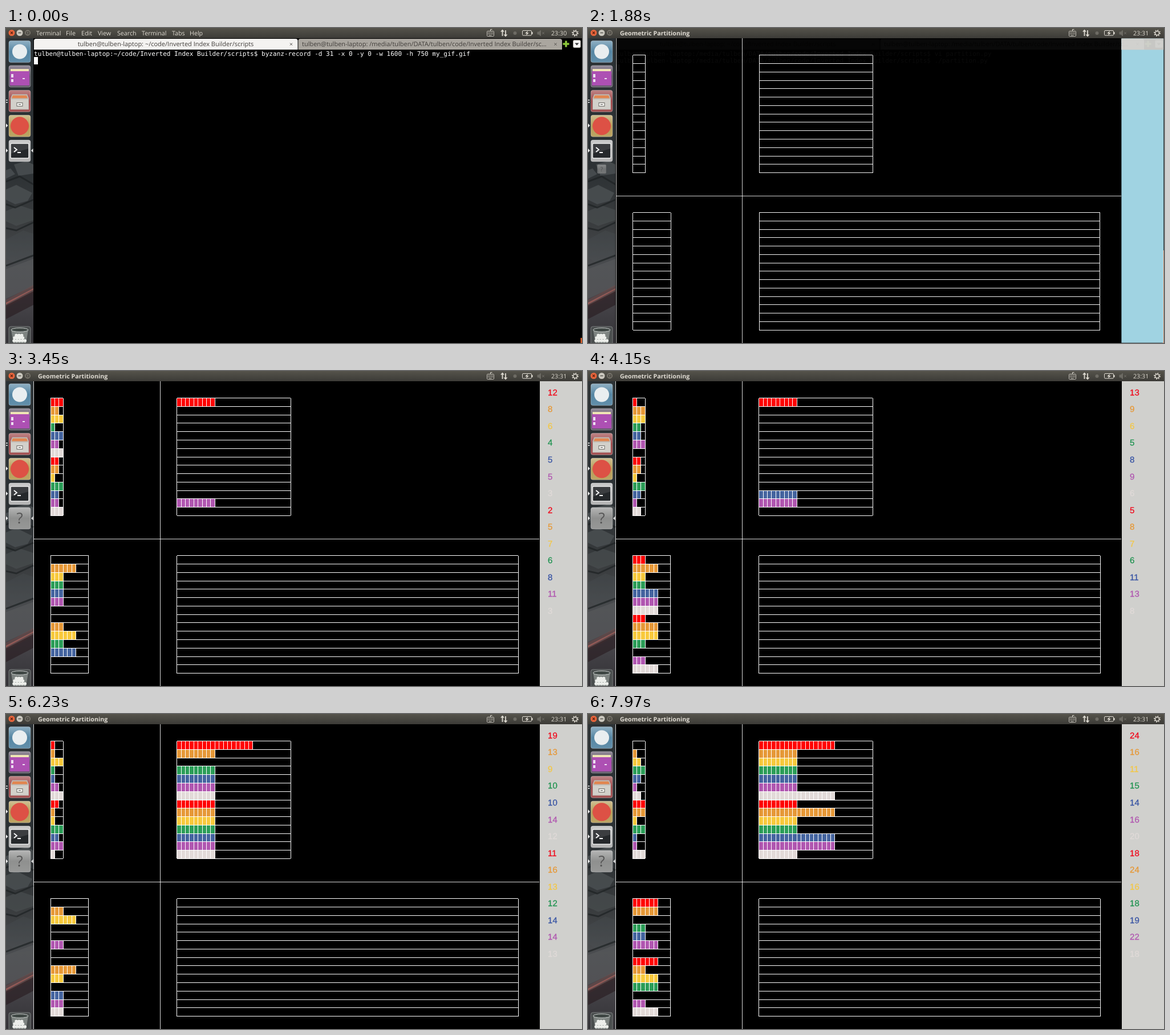
Animation of 1010x554 px, one loop 8 s. Source, as an HTML page:

```html
<!DOCTYPE html>
<html lang="en">
<head>
<meta charset="utf-8">
<title>Geometric Partitioning</title>
<style>
  html, body { margin: 0; width: 100%; height: 100%; overflow: hidden; background: #000; }
  svg { display: block; width: 1010px; height: 554px; }
  text { font-family: "Open Sans", "Noto Sans", sans-serif; font-size: 11px; white-space: pre; text-rendering: geometricPrecision; }
  .bar text { fill: #dfdbd2; font-size: 10.7px; }
  .term text { font-family: "DejaVu Sans Mono", monospace; font-size: 11.05px; fill: #fff; }
  .panel text { font-family: "Liberation Sans", Arial, sans-serif; font-size: 20.3px; stroke-width: .4; }
  .chart, #cursor { shape-rendering: crispEdges; }
  .wire { fill: none; stroke: #fff; stroke-width: 1.353; }
</style>
</head>
<body>
<svg viewBox="0 0 1010 554">
  <defs>
    <linearGradient id="barFill" x2="0" y2="1"><stop stop-color="#55534b"/><stop offset="1" stop-color="#3c3b37"/></linearGradient>
    <linearGradient id="dockFill" x2="0" y2="1">
      <stop stop-color="#2c3235"/><stop offset=".4" stop-color="#2b3033"/><stop offset=".6" stop-color="#383b3d"/>
      <stop offset=".75" stop-color="#4a4c4f"/><stop offset=".86" stop-color="#47454a"/><stop offset="1" stop-color="#333236"/>
    </linearGradient>
    <linearGradient id="shine" x2="0" y2="1"><stop stop-color="#fff" stop-opacity=".4"/><stop offset=".5" stop-color="#fff" stop-opacity=".08"/><stop offset="1" stop-color="#fff" stop-opacity=".15"/></linearGradient>
  </defs>

  <g class="term">
    <rect x="48" y="18" width="962" height="536"/>
    <g id="lines"></g>
    <rect id="cursor" width="7" height="12.4" fill="#fff"/>
    <rect id="scroll" x="1007.500" width="2.500" height="164" fill="#d9632f"/>
  </g>
  <g id="tabs">
    <path d="M982 22.500v11M976.500 28h11" stroke="#8cc63a" stroke-width="3.500"/>
    <rect x="994.500" y="21.500" width="13" height="13" rx="2" fill="#f7f6f4" stroke="#9a968f"/>
    <path d="M997.500 26.500h7l-3.500 4z" fill="#333"/>
  </g>

  <g id="window">
    <rect x="48" y="18" width="888" height="536"/>
    <rect id="panelFill" x="936" y="18" width="74" height="536"/>
    <rect x="936" y="18" width="74" height="20" fill="#d0d0cd"/>
    <g transform="translate(48.500 18) scale(.739)">
      <g class="chart" id="chart"></g>
      <g class="panel" id="panel"></g>
    </g>
  </g>

  <g id="dock">
    <rect y="18" width="48" height="536" fill="url(#dockFill)"/>
    <g fill="#4b5053">
      <path d="M14 240l22-6 12 6v16l-26 4zM0 284l18-8 28 14-8 14-22 6-16-8zM0 250l8-3 8 10-16 8z" opacity=".8"/>
      <path d="M0 322l24-10 24 8v18l-30 10-18-8z" opacity=".6"/>
      <path d="M0 372l30-16 18 6v40L16 414 0 404z" opacity=".3"/>
      <path d="M0 424l48-18v48L0 476z" fill="#5c5e61" opacity=".5"/>
    </g>
    <path d="M0 270l24-9 24 14M0 310l16 6 32-14M0 352l18 4 30-14M0 418l48-18" fill="none" stroke="#1d2123" stroke-width="3" opacity=".7"/>
    <path d="M0 478L48 452v14L0 492z" fill="#8c4a44" opacity=".3"/>
    <path d="M0 483L48 458v2L0 486z" fill="#a2605a" opacity=".8"/>
    <path d="M0 488L48 463v24L0 512z" fill="#2b2024" opacity=".7"/>
  </g>

  <g class="bar">
    <rect width="1010" height="18" fill="url(#barFill)"/>
    <circle cx="10" cy="8.500" r="5.500" fill="#e8653c"/><path d="M8 6.500l4 4m0-4l-4 4" stroke="#5a2010" stroke-width="1.200"/>
    <circle cx="24" cy="8.500" r="5.500" fill="#c9c6bd"/><path d="M21.500 8.500h5" stroke="#44423c" stroke-width="1.200"/>
    <circle cx="38" cy="8.500" r="5" fill="#77746b"/><rect x="35.800" y="6.800" width="4.500" height="3.500" fill="none" stroke="#35332f"/>
    <g id="menu"></g>
    <text id="title" x="56" y="12.500" font-weight="700">Geometric Partitioning</text>
    <g fill="none" stroke="#dfdbd2">
      <rect x="843.500" y="5.500" width="12" height="9" rx="1" opacity=".8"/>
      <path d="M845 8h9M845 10.500h9M847 13h5" stroke-dasharray="1.500 1"/><path d="M849.500 5V2.500h3"/>
      <path d="M870.500 14V5M876 4v9" stroke-width="1.800"/>
      <rect x="905.500" y="4.500" width="16" height="8.500" rx="1.500"/><path d="M922.800 7v4" stroke-width="1.500"/>
      <circle cx="998" cy="9" r="3.500" stroke-width="1.500"/><circle cx="998" cy="9" r="5" stroke-width="2" stroke-dasharray="1.500 2.430"/>
    </g>
    <path d="M867 6.500l3.500-4 3.500 4zM872.500 11.500l3.500 4 3.500-4zM915 5l-5 4.500h3L912 13l5-4.500h-3z" fill="#dfdbd2"/>
    <circle cx="892.500" cy="9" r="3" fill="#6d6b64"/>
    <path d="M932 7h2.500l3-3v10l-3-3H932zM940 7l4 4m0-4l-4 4" fill="#6d6b64" stroke="#6d6b64"/>
    <text id="clock" x="956" y="12.500"></text>
  </g>
</svg>

<script>
const $ = id => document.getElementById(id);
const add = (parent, markup) => {
  parent.insertAdjacentHTML('beforeend', markup);
  return parent.lastElementChild;
};
const show = (el, on) => el.setAttribute('display', on ? 'inline' : 'none');
const setAttrs = (el, attrs) => Object.entries(attrs).forEach(([k, v]) => el.setAttribute(k, v));

const LOOP = 8000, ROWS = 14, CELL_W = 10, CELL_H = 20;
const COLORS = ['#ff0000', '#e69837', '#f8c93c', '#2b9d57', '#44649f', '#b056b0', '#e2dad8'];
const NUMBER_COLORS = ['#f00a1c', '#e69837', '#f3c745', '#1f9350', '#3854a4', '#b056b0', '#e0dad8'];

// Partition boxes: left, top and capacity in cells.
const BOXES = [[40, 40, 3], [40, 415, 9], [340, 40, 27], [340, 415, 81]];

// ---- Partitioning: every op writes one cell ----
const GOALS = [
  { end: 3450, counts: [12, 8, 6, 4, 5, 5, 3, 2, 5, 7, 6, 8, 11, 3], last: 4, tail: 0 },
  { end: 4850, counts: [15, 10, 6, 9, 9, 9, 9, 7, 9, 10, 8, 12, 13, 11], last: 5, tail: 1 },
  { end: 7070, counts: [20, 15, 9, 13, 12, 15, 14, 14, 18, 14, 16, 19, 19, 16], last: 8, tail: 2 },
  { end: 7970, counts: [24, 16, 11, 15, 14, 16, 20, 18, 24, 16, 18, 19, 22, 18], last: 0, tail: 1 },
];
const ops = [];
const cells = Array.from({ length: ROWS }, () => [0, 0, 0]);
const counts = Array(ROWS).fill(0);
let seed = 7;
const random = () => (seed = seed * 16807 % 2147483647) / 2147483647;

function record(row) {
  ops.push({ row, cells: [...cells[row]], label: counts[row] });
}

function grow(row) {
  const c = cells[row];
  if (c[0] === 3) {
    const to = c[1] === 6 ? 2 : 1;
    const moved = to === 2 ? 9 : 3;
    c.fill(0, 0, to);
    for (let i = 0; i < moved; i++) { c[to]++; record(row); }
  }
  c[0]++;
  counts[row]++;
  record(row);
}

let previous = { end: 1925, at: 0 };
const segments = GOALS.map(goal => {
  const queue = goal.counts.flatMap((n, row) => Array(n - counts[row]).fill(row));
  for (let i = queue.length - 1; i > 0; i--) {
    const j = Math.floor(random() * (i + 1));
    [queue[i], queue[j]] = [queue[j], queue[i]];
  }
  queue.forEach(grow);
  grow(goal.last);
  const to = { end: goal.end, at: ops.length - goal.tail };
  const segment = { from: previous, to };
  previous = to;
  return segment;
});

function opsDone(time) {
  const s = segments.find(s => time < s.to.end);
  if (!s) return previous.at;
  const p = Math.max(0, (time - s.from.end) / (s.to.end - s.from.end));
  return Math.floor(s.from.at + p * (s.to.at - s.from.at));
}

// Screen refresh: start, last step, step length.
const REFRESH = [[1780, 16, 830 / 17], [2610, 16, 840 / 17], [3450, 16, 50], [4300, 11, 50],
  [6080, 16, 840 / 17], [6920, 16, 50], [7770, 4, 50]];

function refreshTime(t) {
  const group = REFRESH.filter(g => g[0] <= t).pop();
  if (!group) return t;
  const [start, last, step] = group;
  return start + Math.min(last, Math.floor((t - start) / step + 1e-6)) * step;
}

// ---- Chart ----
const chart = $('chart');
const bars = BOXES.slice(0, 3).map(([x, y]) => Array.from({ length: ROWS }, (_, r) => ({
  fill: add(chart, `<rect x="${x}" y="${y + r * CELL_H}" height="${CELL_H}" fill="${COLORS[r % 7]}"/>`),
  ticks: add(chart, '<path class="wire"/>'),
})));
for (const [x, y, size] of BOXES) {
  const w = size * CELL_W;
  let d = `M${x} ${y}v${ROWS * CELL_H}m${w} 0v${-ROWS * CELL_H}`;
  for (let r = 0; r <= ROWS; r++) d += `M${x} ${y + r * CELL_H}h${w}`;
  add(chart, `<path class="wire" d="${d}"/>`);
}
add(chart, '<path class="wire" stroke-opacity=".85" d="M.3 0V726M300 0V726M0 375H1200"/>');
const numbers = Array.from({ length: ROWS }, (_, r) => {
  const color = NUMBER_COLORS[r % 7];
  return add($('panel'), `<text x="1220" y="${33.5 + r * 40}" fill="${color}" stroke="${color}"></text>`);
});

function drawChart(done) {
  const view = Array.from({ length: ROWS }, () => ({ cells: [0, 0, 0], label: '' }));
  for (let i = 0; i < done; i++) {
    const op = ops[i];
    view[op.row].cells = op.cells;
    if (i < done - 1) view[op.row].label = op.label;
  }
  view.forEach((v, r) => {
    numbers[r].textContent = v.label;
    v.cells.forEach((n, b) => {
      const [x, y] = BOXES[b];
      let d = '';
      for (let i = 1; i <= n; i++) d += `M${x + i * CELL_W} ${y + r * CELL_H}v${CELL_H}`;
      bars[b][r].fill.setAttribute('width', n * CELL_W);
      bars[b][r].ticks.setAttribute('d', d);
    });
  });
}

// ---- Terminal ----
const HOST = 'tulben@tulben-laptop:';
const HOME = '~/code/Inverted Index Builder/scripts';
const MEDIA = '/media/tulben/DATA/tulben/code/Inverted Index Builder/scripts';
const homePrompt = `${HOST}${HOME}$ `, mediaPrompt = `${HOST}${MEDIA}$ `;
const CHAR_W = 6.6527, LINE_H = 12.4;
const lines = [0, 1].map(i => add($('lines'), `<text x="49" y="${48.7 + i * LINE_H}"></text>`));

const tabs = [[49, 280, 'middle', `${HOST} ${HOME}`], [512.5, 519, 'start', `${HOST} ${MEDIA.slice(0, -5)}…`]]
  .map(([x, tx, anchor, label]) => {
    const shape = add($('tabs'), `<path d="M${x} 38V22.500q0-3.500 3.500-3.500h455.500q3.500 0 3.500 3.500v15.500z"/>`);
    add($('tabs'), `<text x="${tx}" y="32" fill="#403d3a" text-anchor="${anchor}">${label}</text>`);
    add($('tabs'), `<path d="M${x + 449} 26.500l4 4m0-4l-4 4" stroke="#4a4744"/>`);
    return shape;
  });

function drawTerminal(t) {
  const second = t >= 580;
  const typed = t < 930 ? '' : t < 1340 ? 'vi partition.py ' : './partition.py ';
  const text = second
    ? [mediaPrompt + 'vi partition.py', mediaPrompt + typed]
    : [homePrompt + 'byzanz-record -d 31 -x 0 -y 0 -w 1600 -h 750 my_gif.gif', ''];
  lines.forEach((line, i) => { line.textContent = text[i]; });
  const row = t < 1590 ? 1 : 2;
  const column = row === 1 ? text[1].length : 0;
  setAttrs($('cursor'), { x: 49 + column * CHAR_W, y: 38.8 + row * LINE_H });
  $('scroll').setAttribute('y', second ? 391 : 545);
  tabs.forEach((tab, i) => tab.setAttribute('fill', second === (i === 1) ? '#f4f3f1' : '#aaa69f'));
}

// ---- Menu and launcher ----
const MENU = { 53: 'Terminal', 105: 'File', 132: 'Edit', 161: 'View', 195: 'Search', 238: 'Terminal', 291: 'Tabs', 322: 'Help' };
for (const [x, label] of Object.entries(MENU)) add($('menu'), `<text x="${x}" y="12.500">${label}</text>`);

const dock = $('dock');
const tile = (y, color, art) => add(dock, `<g transform="translate(24 ${y})">
  <rect x="-19" y="-19" width="38" height="38" rx="3.500" fill="${color}" stroke="#c8ccd0" stroke-opacity=".4"/>
  <rect x="-19" y="-19" width="38" height="38" rx="3.500" fill="url(#shine)"/>${art}</g>`);

tile(41.5, '#477c9c', '<circle r="13" fill="#e9eef0"/>');
tile(85, '#4f4257', `<path d="M-16-13h32v5h-32z" fill="#efe5b5"/><path d="M-17-9h34v25h-34z" fill="#ad50b3"/>
  <path d="M-15-4h4v6h-4zM-15 5h4v5h-4zM5 3h4v2h-4z" fill="#ecdff0"/>`);
tile(128.5, '#963537', `<path d="M-13-12h26l3 7v20h-32V-5z" fill="#bdbbb6"/><path d="M-12-10h24l2 5h-28z" fill="#e18650"/>
  <path d="M-15-3h30v17h-30z" fill="#d2d0ca"/><rect x="-5" y="3" width="10" height="6" fill="#f3f2ee" stroke="#6d6b67"/><path d="M-2 6h4" stroke="#555"/>`);
tile(172.3, '#b1954a', '<circle r="16" fill="#dd5145"/>');
tile(216, '#a9a9a9', `<rect x="-16" y="-13" width="32" height="26" rx="2" fill="#25282b" stroke="#ececec" stroke-width="1.500"/>
  <path d="M-16-13h32v9l-32 9z" fill="#fff" opacity=".1"/><path d="M-10-6l5 4-5 4M-4 3h6" fill="none" stroke="#fff" stroke-width="1.800"/>`);
const appTile = tile(259, '#858685', '<text y="9" text-anchor="middle" fill="#555" style="font-size:26px">?</text>');
add(dock, `<g><rect x="5" y="525" width="38" height="38" rx="3.500" fill="#4a4e4e" stroke="#a0a4a4" stroke-opacity=".6"/>
  <path d="M9 531h30l-4 23H13z" fill="#7d8380"/><ellipse cx="24" cy="531" rx="15" ry="3.500" fill="#3f4744" stroke="#cfd3d1"/>
  <path d="M15 545h19M14 550h22M18 540.500h14" stroke="#eceeea" stroke-width="5.500" stroke-linecap="round" stroke-dasharray=".1 4.700"/></g>`);
add(dock, '<path d="M0 168l3.500 3.500L0 175zM0 212l3.500 3.500L0 219zM0 126h3v1.500H0zM0 130h3v1.500H0z" fill="#e8e8e8"/>');
const termArrow = add(dock, '<path d="M47.500 212l-3.500 3.500 3.500 3.500z" fill="#e8e8e8"/>');
const appArrows = add(dock, '<path d="M47.500 255.500l-3.500 3.500 3.500 3.500zM0 255.500l3.500 3.500L0 262.500z" fill="#e8e8e8"/>');

function drawDesktop(t) {
  const open = t >= 1820;
  const opening = t < 1870 ? [.5, .97] : t < 1920 ? [.96, .9985] : [1, 1];
  show($('window'), open);
  show($('menu'), !open);
  show($('title'), open);
  setAttrs($('window'), {
    opacity: opening[0],
    transform: `translate(529 286) scale(${opening[1]}) translate(-529 -286)`,
  });
  $('panelFill').setAttribute('fill', t < 1920 ? '#a7dcec' : '#d0d0cd');
  $('clock').textContent = t < 1780 ? '23:30' : '23:31';

  const p = Math.min(1, Math.max(0, (t - 1790) / 220));
  show(appTile, open);
  setAttrs(appTile, { transform: `translate(24 ${241 + 18 * p}) scale(${p})`, opacity: .3 + .7 * p });
  show(termArrow, !open);
  show(appArrows, p === 1);
}

function frame() {
  const t = performance.now() % LOOP;
  const shown = refreshTime(t);
  drawTerminal(t);
  drawDesktop(shown);
  drawChart(opsDone(shown));
  requestAnimationFrame(frame);
}
frame();
</script>
</body>
</html>
```
